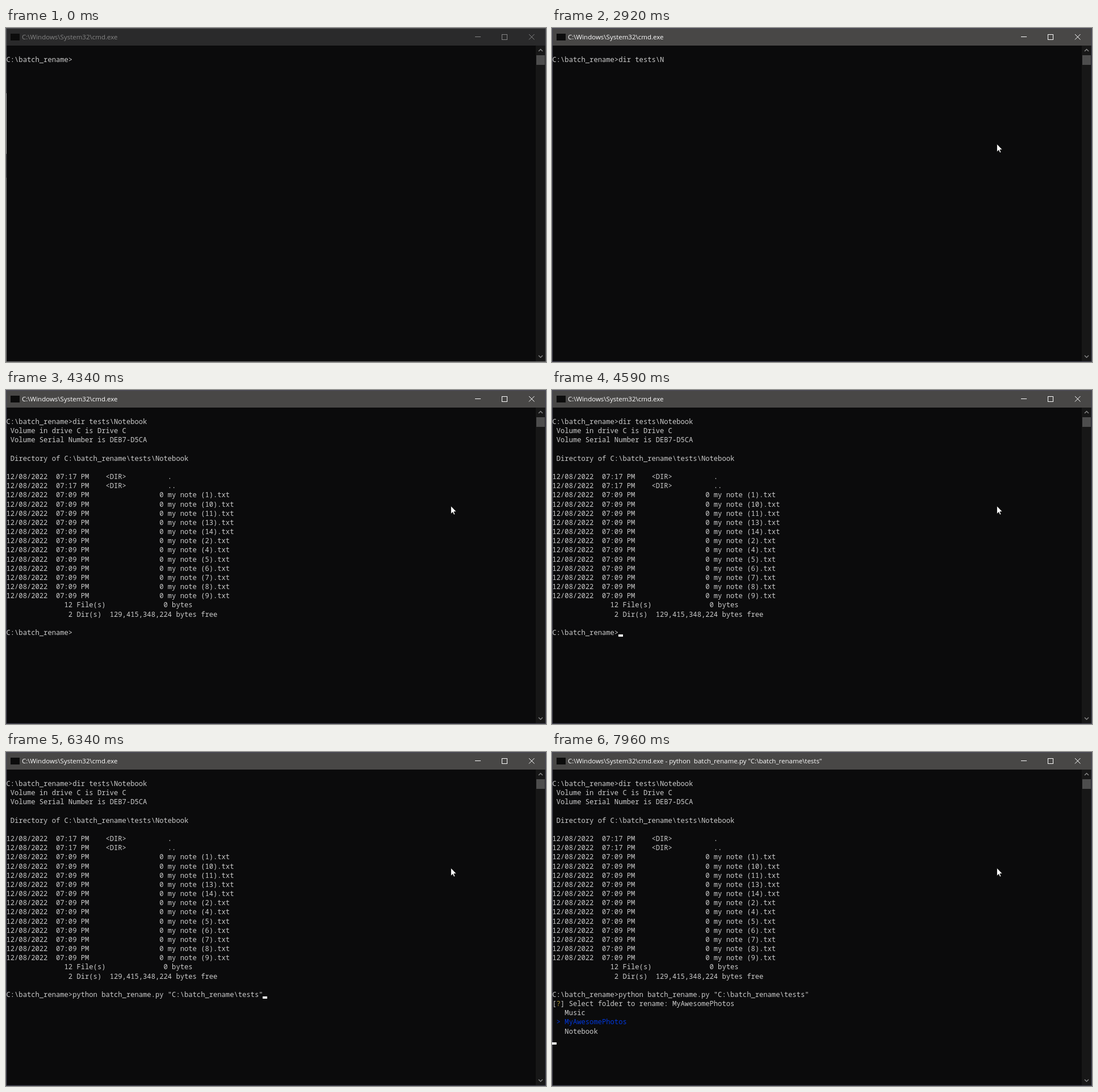
An HTML page with a canvas that plays this animation: 951 by 589 pixels, repeating every 8 s.

```html
<!DOCTYPE html>
<html lang="en">
<head>
<meta charset="utf-8">
<title>Console</title>
<style>
  html, body { margin: 0; width: 100%; height: 100%; overflow: hidden; background: #0b0b0c; }
  canvas { display: block; }
</style>
</head>
<body>
<canvas id="stage" width="951" height="589"></canvas>
<script>
const ctx = document.getElementById('stage').getContext('2d');
const LOOP = 8000, W = 951, H = 589, BAR = 31;
const CELL = 7.29, ROW = 16.17;
const MONO = '12.15px "Noto Sans Mono", "DejaVu Sans Mono", monospace';
const SANS = '11.5px "Open Sans", "Noto Sans", sans-serif';
const BACK = '#0b0b0c', GRAY = '#cccccc', BLUE = '#0037da', YELLOW = '#b39a38';

const FOCUS = 420, LIST = 4250, PASTE = 6300, RUN = 6880, MENU = 7290, PICK = 7940;
const BLINK = 500, ECHO = 40;
const PROMPT = 'C:\\batch_rename>';
const RUN_CMD = 'python batch_rename.py "C:\\batch_rename\\tests"';
const TITLE = 'C:\\Windows\\System32\\cmd.exe';

// Typing comes in bursts at a steady pace: text, first key, last key.
const bursts = [
  ['dir t', 1210, 1415],
  ['ests', 1590, 1920],
  ['\\', 2250, 2250],
  ['Not', 2890, 3240],
  ['ebook', 3420, 3660]
];
const keys = bursts.flatMap(([text, from, to]) =>
  [...text].map((ch, i) => ({ ch, at: from + (to - from) * i / Math.max(1, text.length - 1) })));

const stamp = time => '12/08/2022  ' + time + ' PM';
const notes = Array.from({ length: 14 }, (_, i) => i + 1).filter(n => n !== 3 && n !== 12).sort();
const listing = [
  ' Volume in drive C is Drive C',
  ' Volume Serial Number is DEB7-D5CA',
  '',
  ' Directory of C:\\batch_rename\\tests\\Notebook',
  '',
  ...['.', '..'].map(d => stamp('07:17') + '    <DIR>' + ' '.repeat(10) + d),
  ...notes.map(n => stamp('07:09') + '0'.padStart(18) + ' my note (' + n + ').txt'),
  '12'.padStart(16) + ' File(s)' + '0'.padStart(15) + ' bytes',
  '2'.padStart(16) + ' Dir(s)  129,415,348,224 bytes free'
];
const folders = ['Music', 'MyAwesomePhotos', 'Notebook'];

function rect(x, y, w, h, color) {
  ctx.fillStyle = color;
  ctx.fillRect(x, y, w, h);
}

function trace(points) {
  ctx.beginPath();
  for (const [x, y] of points) ctx.lineTo(x, y);
}

function line(color, width, ...points) {
  ctx.strokeStyle = color;
  ctx.lineWidth = width;
  trace(points);
  ctx.stroke();
}

function chevron(y, dir) {
  line('#858585', 1.5, [938, y - dir * 1.75], [941.5, y + dir * 1.75], [945, y - dir * 1.75]);
}

function print(text, row, col = 0, color = GRAY) {
  ctx.font = MONO;
  ctx.fillStyle = color;
  const y = Math.round(BAR + row * ROW + 12.8);
  [...text].forEach((ch, i) => {
    if (ch !== ' ') ctx.fillText(ch, (col + i) * CELL + 0.5, y);
  });
}

function drawWindow(t) {
  const active = t >= FOCUS;
  const ink = active ? '#ffffff' : '#858585';
  rect(0, 0, W, H, BACK);
  rect(0, 0, W, BAR, active ? '#484746' : '#2a2a2b');

  // Window icon, kept as a plain block
  rect(8, 10, 16, 12, '#0c0c0c');

  ctx.font = SANS;
  ctx.fillStyle = ink;
  const args = t >= RUN ? ' - ' + RUN_CMD.replace(' ', '  ') : '';
  ctx.fillText(TITLE + args, 28, 20);

  rect(826, 15, 10, 1, ink);
  ctx.strokeStyle = ink;
  ctx.lineWidth = 1;
  ctx.strokeRect(873.5, 11.5, 9, 9);
  line(ink, 1, [921, 11], [930.5, 20.5]);
  line(ink, 1, [930.5, 11], [921, 20.5]);

  // Scrollbar
  rect(933, BAR, 17, H - BAR - 1, '#171717');
  rect(934, 48, 15, 17, '#4d4d4d');
  chevron(39.25, -1);
  chevron(579.25, 1);

  ctx.strokeStyle = active ? '#4b4a58' : '#55555a';
  ctx.strokeRect(0.5, 0.5, W - 1, H - 1);
  if (!active) {
    // Bright desktop beside the unfocused window
    rect(0, 115, 1, 107, '#aaaaaa');
    rect(0, 264, 1, H - 264, '#808080');
    rect(0, H - 1, W, 1, '#707070');
  }
}

// A key hides the cursor for a moment, then lights it until the next blink.
function cursorLit(t, typed) {
  if (t >= RUN) return true;
  let last = BLINK;
  if (typed) last = keys[typed - 1].at + ECHO;
  if (t >= PASTE) last = PASTE + ECHO;
  const beats = Math.floor(t / BLINK) - Math.floor(last / BLINK);
  return t >= last && beats % 2 === 0;
}

function drawConsole(t) {
  const typed = keys.filter(k => t >= k.at).length;
  let text = PROMPT + keys.slice(0, typed).map(k => k.ch).join('');
  let row = 1;
  print(text, row);

  if (t >= LIST) {
    listing.forEach((entry, i) => print(entry, i + 2));
    text = PROMPT + (t >= PASTE ? RUN_CMD : '');
    row = listing.length + 3;
    print(text, row);
  }
  let col = text.length;
  if (t >= RUN) {
    row++;
    col = 0;
  }
  if (t >= MENU) {
    const chosen = t >= PICK ? 1 : 0;
    print('[ ] Select folder to rename: ' + folders[chosen], row);
    print('?', row, 1, YELLOW);
    folders.forEach((name, i) => {
      const on = i === chosen;
      print((on ? ' > ' : '   ') + name, row + 1 + i, 0, on ? BLUE : GRAY);
    });
    row += folders.length + 1;
  }
  if (cursorLit(t, typed))
    rect(Math.round(col * CELL), Math.round(BAR + row * ROW + 12), 8, 4, '#ffffff');
}

function drawPointer(t) {
  if (t < 40) return;
  const rest = (1 - Math.min(1, (t - 40) / 340)) ** 3;
  ctx.save();
  ctx.translate(783.5 + 70 * rest, 204.5 + 384 * rest);
  trace([[0, 0], [0, 14], [3.2, 11], [5.3, 15.6], [7.4, 14.7], [5.4, 10.2], [9.6, 10]]);
  ctx.closePath();
  ctx.fillStyle = '#ffffff';
  ctx.fill();
  ctx.strokeStyle = '#101010';
  ctx.lineWidth = 0.8;
  ctx.stroke();
  ctx.restore();
}

function tick() {
  const t = performance.now() % LOOP;
  drawWindow(t);
  drawConsole(t);
  drawPointer(t);
  requestAnimationFrame(tick);
}
tick();
</script>
</body>
</html>
```
